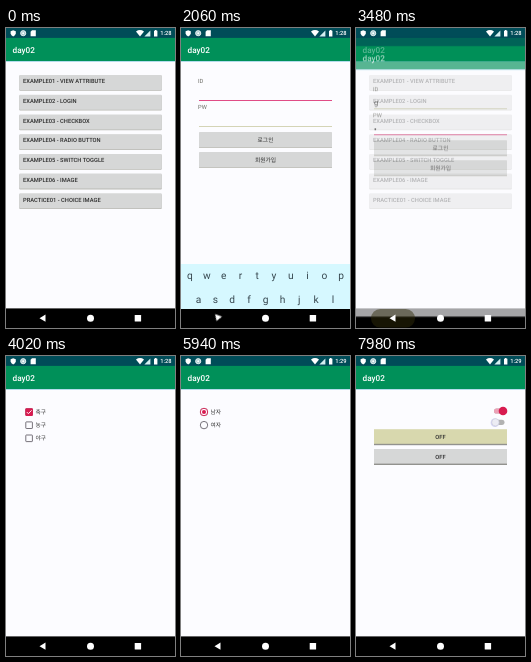
Animation, 169 px wide and 300 px high, one loop 8000 ms. Source, as an HTML page:

```html
<!DOCTYPE html>
<html lang="ko">
<head>
<meta charset="utf-8">
<title>day02</title>
<style>
html, body { margin: 0; width: 100%; height: 100%; overflow: hidden; background: #fcfcff; }
#stage { display: block; width: 100vw; height: 100vh; }
text {
  font-family: Roboto, "Noto Sans CJK KR", "Noto Sans CJK", sans-serif;
  font-size: 5.75px; fill: #333; text-rendering: geometricPrecision;
}
.title { font-size: 8.2px; font-weight: 500; fill: #fff; }
.caps { font-weight: 500; fill: #2c2c2c; }
.mid { text-anchor: middle; }
.soft { fill: #6c6c66; }
.key { font-size: 10.2px; fill: #37474f; text-anchor: middle; }
.digit { font-size: 8.6px; }
.grow, #backIcon { transform-box: fill-box; transform-origin: center; }
</style>
</head>
<body>
<svg id="stage" viewBox="0 0 169 300" preserveAspectRatio="none"></svg>
<script>
const LOOP = 8000;
const ACCENT = '#d81b50';
const BUTTON = '#d6d7d7';
const css = [];

// Each frame is [ms, declarations]; the first and last are held to the loop's ends.
function animate(id, frames, easing = 'linear') {
  const all = [[0, frames[0][1]], ...frames, [LOOP, frames.at(-1)[1]]];
  const body = all.map(([ms, rule]) => `${ms / LOOP * 100}%{${rule}}`).join('');
  css.push(`@keyframes ${id}{${body}} #${id}{animation:${id} ${LOOP}ms ${easing} infinite}`);
}
const fade = (id, ...points) => animate(id, points.map(([ms, v]) => [ms, `opacity:${v}`]));
const show = (id, from, to = LOOP) =>
  animate(id, [[0, 'opacity:0'], [from, 'opacity:1'], [to, `opacity:${to < LOOP ? 0 : 1}`]], 'step-end');

const text = (x, y, str, attrs = '') => `<text x="${x}" y="${y}" ${attrs}>${str}</text>`;
const rect = (x, y, w, h, fill, attrs = '') =>
  `<rect x="${x}" y="${y}" width="${w}" height="${h}" fill="${fill}" ${attrs}/>`;
const circle = (x, y, r, fill, attrs = '') =>
  `<circle cx="${x}" cy="${y}" r="${r}" fill="${fill}" ${attrs}/>`;
const path = (d, attrs) => `<path d="${d}" ${attrs}/>`;
const line = (d, color, width = 0.8) => path(d, `fill="none" stroke="${color}" stroke-width="${width}"`);
const group = (id, content) => `<g id="${id}">${content}</g>`;

const activity = (id, content) => group(id,
  rect(0, 0, 169, 300, '#fcfcff') +
  rect(0, 0, 169, 10, '#004c58') +
  rect(0, 9.9, 169, 23.1, '#009059') +
  rect(0, 33, 169, 1, '#b4dcec') +
  text(6.5, 24.6, 'day02', 'class="title"') +
  content +
  rect(0, 280.4, 169, 20, '#000'));

function transition(id, open, close) {
  const away = 'opacity:0;transform:translateY(24px)';
  const home = 'opacity:1;transform:translateY(0)';
  const frames = [[open, away + ';animation-timing-function:ease-out'], [open + 130, home]];
  if (close) frames.push([close, home], [close + 120, away]);
  animate(id, frames);
}

function list() {
  const labels = ['EXAMPLE01 - VIEW ATTRIBUTE', 'EXAMPLE02 - LOGIN', 'EXAMPLE03 - CHECKBOX',
    'EXAMPLE04 - RADIO BUTTON', 'EXAMPLE05 - SWITCH TOGGLE', 'EXAMPLE06 - IMAGE',
    'PRACTICE01 - CHOICE IMAGE'];
  const taps = [740, 1700, 3800, 5150, 7300];
  return labels.map((label, i) => {
    const y = 47 + i * 19.72;
    let ripple = '';
    if (i < taps.length) {
      const id = 'tap' + i, t = taps[i];
      ripple = `<svg x="13.2" y="${y}" width="142.6" height="15">` +
        circle(71, 7.5, 74, '#000', `id="${id}" class="grow"`) + '</svg>';
      animate(id, [[t, 'opacity:0;transform:scale(.1)'], [t + 30, 'opacity:.12;transform:scale(.4)'],
        [t + 110, 'opacity:.12;transform:scale(1)'], [t + 220, 'opacity:0;transform:scale(1)']]);
    }
    return rect(13.2, y + 0.6, 142.6, 15.2, '#b9b9b4', 'rx="1"') +
      rect(13.2, y, 142.6, 15, BUTTON, 'rx="1"') + ripple +
      text(17, y + 8.2, label, 'class="caps"');
  }).join('');
}

const attributes = () =>
  text(16, 56, 'textColor 속성', 'style="fill:#35ef70"') +
  text(16, 80, 'textSize 속성', 'class="soft" style="font-size:20.5px"') +
  text(16, 91.5, 'typeface 속성', `class="soft" style="font-family:'Noto Serif','Noto Serif CJK KR',serif"`) +
  text(16, 99.2, 'textStyle 속성', 'style="font-weight:700;font-style:italic;font-size:5.5px;fill:#666"') +
  '<svg x="16" y="102" width="137" height="60">' +
  text(0, 43, 'singleLine 속성', 'class="soft" style="font-size:41px"') + '</svg>';

function login() {
  const button = (y, label) => rect(18, y, 133, 15.4, BUTTON, 'rx=".8"') +
    rect(18, y + 15, 133, 0.8, '#bcbcb4') + text(84.5, y + 9.7, label, 'class="caps mid"');
  const field = (y, id) => rect(18, y, 133, 0.7, '#c3c397') + rect(18, y - 0.2, 133, 1, '#e04c86', `id="${id}"`);
  show('idFocus', 1980, 2320);
  show('pwFocus', 2320);
  show('idText', 2180);
  show('pwText', 2600, 2800);
  show('pwDot', 2800);
  return text(17, 55.2, 'ID', 'class="soft"') + text(17, 81.2, 'PW', 'class="soft"') +
    field(72.2, 'idFocus') + field(98.2, 'pwFocus') +
    text(18, 69.2, 'g', 'id="idText" style="font-size:7.4px"') +
    text(18, 95.2, 'g', 'id="pwText" style="font-size:7.4px"') +
    circle(19.3, 93, 0.9, '#333', 'id="pwDot"') +
    button(104, '로그인') + button(124, '회원가입');
}

function checkboxes() {
  return ['축구', '농구', '야구'].map((label, i) => {
    const y = 56 + i * 13.1, id = 'check' + i, t = 3985 + i * 210;
    fade(id, [t, 0], [t + 30, 1]);
    return rect(19.8, y - 3.2, 6.6, 6.6, 'none', 'rx=".5" stroke="#68646c" stroke-width=".9"') +
      group(id, rect(19.3, y - 3.7, 7.6, 7.6, ACCENT, 'rx=".8"') +
        line(`M20.8 ${y}l1.6 1.7 3.2-3.4`, '#fff', 0.9)) +
      text(29.5, y + 2.1, label);
  }).join('');
}

function radios() {
  animate('radio0', [[0, 'opacity:0'], [5690, 'opacity:1'], [5980, 'opacity:0']], 'step-end');
  show('radio1', 5980);
  return ['남자', '여자'].map((label, i) => {
    const y = 56 + i * 13.1;
    return circle(23, y, 3.7, 'none', 'stroke="#68646c" stroke-width=".9"') +
      group('radio' + i, circle(23, y, 3.7, '#fcfcff', `stroke="${ACCENT}" stroke-width=".9"`) +
        circle(23, y, 2, ACCENT)) +
      text(29.5, y + 2.1, label);
  }).join('');
}

function switches() {
  const toggle = (y, fill) => rect(18, y, 133, 15, fill) +
    rect(18, y + 14.6, 133, 1.4, '#92928e') + text(84.5, y + 9.8, 'OFF', 'class="caps mid"');
  const track = (y, fill, attrs = '') => rect(138, y - 2.6, 10.5, 5.2, fill, `rx="2.6" ${attrs}`);
  fade('trackOn', [7700, 0], [7780, 1]);
  animate('thumb', [[7700, 'transform:translateX(-8px);fill:#f0f0f2'],
    [7790, `transform:translateX(0);fill:${ACCENT}`]]);
  fade('halo', [7910, 0], [7970, 0.8]);
  return track(55, '#b2b2b2') + track(55, '#eba1b6', 'id="trackOn"') +
    circle(147, 55, 4.3, ACCENT, 'id="thumb"') +
    track(66.3, '#b2b2b2') + circle(139, 66.7, 4.4, '#ccccf2', 'id="halo"') +
    circle(139.4, 66.3, 3.6, '#ececf4', 'stroke="#c4c4d0" stroke-width=".5"') +
    toggle(73.2, '#d8d8ae') + toggle(93, BUTTON);
}

function keyboard() {
  const row = (keys, x, y, cls = 'key') =>
    [...keys].map((k, i) => text(x + i * 16.8, y, k, `class="${cls}"`)).join('');
  animate('keyboard', [[2000, 'transform:translateY(118px)'], [2110, 'transform:translateY(0)'],
    [3260, 'transform:translateY(0)'], [3370, 'transform:translateY(140px)']]);
  show('digits', 2340, 3375);
  return '<svg width="169" height="280.4">' + group('keyboard',
    group('digits', rect(0, 164, 169, 20, '#d8d8fb') + row('1234567890', 9, 177, 'key digit')) +
    rect(0, 183, 169, 98, '#d6f8ff') +
    row('qwertyuiop', 9, 198) + row('asdfghjkl', 17.5, 222) + row('zxcvbnm', 34, 246.3) +
    line('M13 238.8l-4.2 4.3h2.2v4h4v-4h2.2z', '#37474f') +
    line('M150 243l3-3.6h7v7.2h-7zM154.4 241.2l3.6 3.6M158 241.2l-3.6 3.6', '#37474f') +
    text(13, 269.3, '?123', 'class="key" style="font-size:7px"') +
    text(34, 269.5, ',', 'class="key"') + text(135, 269.5, '.', 'class="key"') +
    rect(46.5, 260.8, 76, 12, '#cfd0cd', 'rx="1"') +
    circle(155.2, 267, 7.3, '#3fa692') + line('M152 267.2l2.3 2.3 4.4-4.6', '#fff', 1)) + '</svg>';
}

function systemBars() {
  animate('backIcon', [[2000, 'transform:rotate(0)'], [2080, 'transform:rotate(-90deg)'],
    [3290, 'transform:rotate(-90deg)'], [3370, 'transform:rotate(0)']]);
  show('imeIcon', 2080, 3300);
  show('clockNew', 5900);
  animate('clockOld', [[0, 'opacity:1'], [5900, 'opacity:0']], 'step-end');
  const presses = [[1300, 1440], [3210, 3260], [3400, 3440], [4680, 4800], [6760, 6860]];
  const ripples = presses.map(([down, up], i) => {
    const id = 'back' + i;
    animate(id, [[down, 'opacity:0;transform:scale(.3)'], [down + 40, 'opacity:1;transform:scale(1)'],
      [up, 'opacity:1;transform:scale(1)'], [up + 80, 'opacity:0;transform:scale(1)']]);
    return rect(15, 281, 44, 18.6, '#302c0a', `id="${id}" class="grow" rx="9.3"`);
  }).join('');
  const clock = 'style="font-weight:500;fill:#fff"';
  return path('M4.6 3.2l2.6-1 2.6 1v2.2q-.4 2.1-2.6 3.1-2.2-1-2.6-3.1z', 'fill="#fff"') +
    circle(17.2, 5.2, 2.6, '#a8ccd0', 'stroke="#fff" stroke-width=".8"') + circle(17.2, 5.2, 1, '#fff') +
    path('M26 2.2h3.8v6h-5.2V3.8z', 'fill="#fff"') +
    path('M130 3.4q4-2.6 8 0l-4 5z', 'fill="#fff"') +
    path('M144.4 2.4v6h-6z', 'fill="#d4eef0"') +
    path('M148.9 2h1.6v.8h.9v5.7h-3.4V2.8h.9z', 'fill="#fff"') +
    text(154.2, 7.4, '1:28', 'id="clockOld" ' + clock) +
    text(154.2, 7.4, '1:29', 'id="clockNew" ' + clock) +
    ripples +
    path('M33.5 290.2l6-3.6v7.2z', 'id="backIcon" fill="#fff"') +
    circle(84.5, 290.2, 3.5, '#fff') + rect(128.7, 287, 6.4, 6.4, '#fff', 'rx=".5"') +
    group('imeIcon', rect(152.6, 287.6, 8, 5.2, '#fff', 'rx=".6"') +
      line('M153.6 289.2h6M153.6 290.5h6M155 291.8h3.2', '#555', 0.5));
}

transition('attr', 870, 1440);
transition('login', 1810, 3440);
transition('check', 3850, 4800);
transition('radio', 5270, 6860);
transition('switch', 7420);

document.getElementById('stage').innerHTML =
  activity('home', list()) +
  activity('attr', attributes()) +
  activity('login', login()) +
  activity('check', checkboxes()) +
  activity('radio', radios()) +
  activity('switch', switches()) +
  keyboard() + systemBars();

const sheet = document.createElement('style');
sheet.textContent = css.join('\n');
document.head.append(sheet);
</script>
</body>
</html>
```
